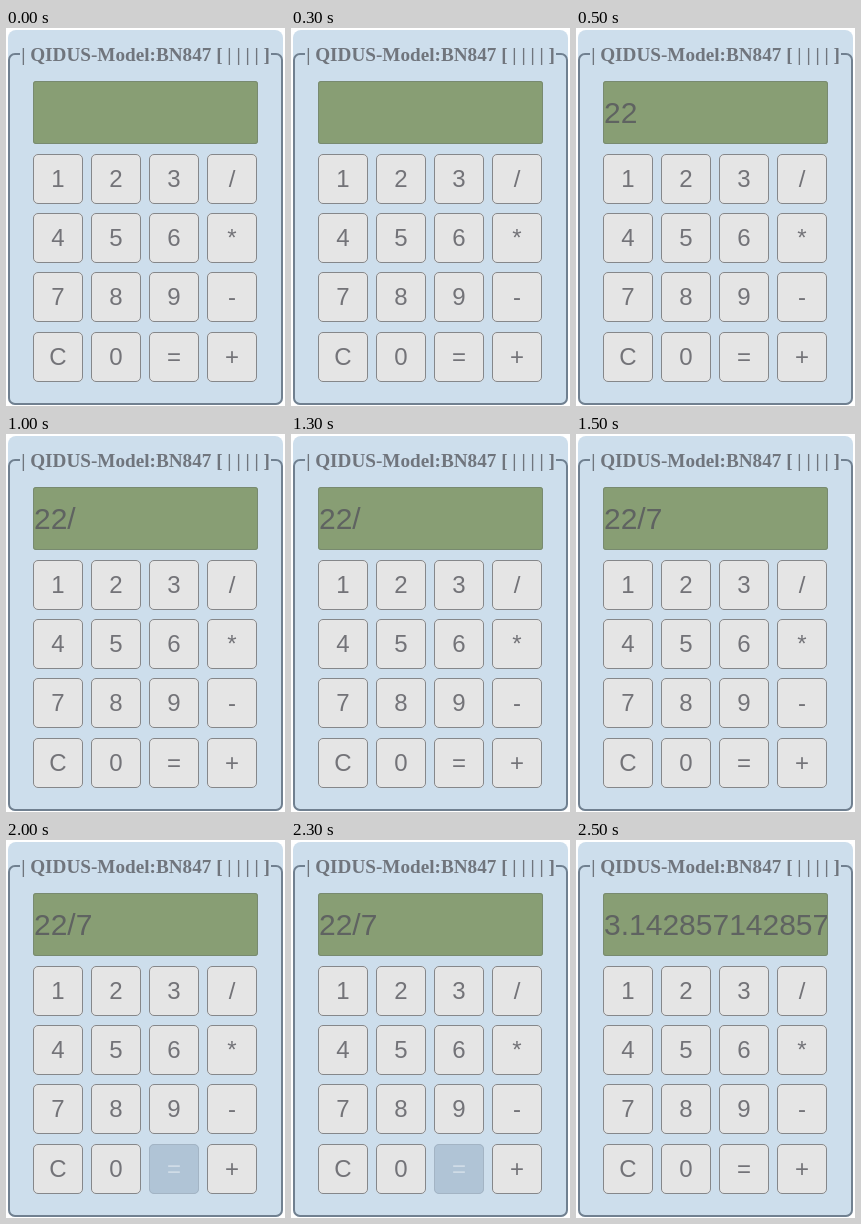
Write an HTML page with a canvas that moves like this. It is 279 by 378 pixels and loops after 3000 ms.

```html
<!DOCTYPE html>
<html lang="en">
<head>
<meta charset="utf-8">
<title>Calculator</title>
<style>
  html, body { margin: 0; width: 100%; height: 100%; overflow: hidden; background: #fff; }
  canvas { display: block; }
</style>
</head>
<body>
<canvas id="stage" width="279" height="378"></canvas>
<script>
const ctx = document.getElementById('stage').getContext('2d');
const SANS = '"Liberation Sans", Arial, sans-serif';
const SERIF = '"Liberation Serif", "Times New Roman", serif';
const LOOP = 3000, STEP = 500;
const STEPS = [
  { text: '' },
  { text: '22' },
  { text: '22/' },
  { text: '22/7' },
  { text: '22/7', pressed: '=' },
  { text: '3.142857142857' }
];
const KEYS = ['123/', '456*', '789-', 'C0=+'];
const ROWS = [126, 185, 244, 304];

function box(x, y, w, h, radius, fill, stroke, line = 1) {
  ctx.beginPath();
  ctx.roundRect(x, y, w, h, radius);
  if (fill) {
    ctx.fillStyle = fill;
    ctx.fill();
  }
  if (stroke) {
    ctx.beginPath();
    ctx.roundRect(x + line / 2, y + line / 2, w - line, h - line, radius - line / 2);
    ctx.strokeStyle = stroke;
    ctx.lineWidth = line;
    ctx.stroke();
  }
}

function label(text, x, y, font, color, align = 'left') {
  ctx.font = font;
  ctx.fillStyle = color;
  ctx.textAlign = align;
  ctx.fillText(text, x, y);
}

function drawCase() {
  box(2, 2, 275, 375, 8, '#cddeec');
  box(2, 25, 275, 352, 7, null, '#708090', 2);
  ctx.fillStyle = '#cddeec';
  ctx.fillRect(14, 16, 251, 20);
  label('| QIDUS-Model:BN847 [ | | | | ]', 139.5, 33, `bold 19.2px ${SERIF}`, '#70757d', 'center');
}

function drawDisplay(text) {
  box(27, 53, 225, 63, 3, '#889e74', '#788a70');
  ctx.save();
  ctx.beginPath();
  ctx.rect(28, 54, 223, 61);
  ctx.clip();
  label(text, 28, 95, `30px ${SANS}`, '#5f6361');
  ctx.restore();
}

function drawKey(key, x, y, pressed) {
  box(x, y, 50, 50, 5, pressed ? '#b0c4d6' : '#e5e5e5', pressed ? '#a3b4c4' : '#85878a');
  label(key, x + 25, y + 33, `24px ${SANS}`, pressed ? '#d0dce7' : '#737378', 'center');
}

function draw(time) {
  const { text, pressed } = STEPS[Math.floor(time % LOOP / STEP)];
  ctx.fillStyle = '#fff';
  ctx.fillRect(0, 0, 279, 378);
  drawCase();
  drawDisplay(text);
  KEYS.forEach((row, r) => [...row].forEach((key, c) =>
    drawKey(key, 27 + 58 * c, ROWS[r], key === pressed)));
}

const start = performance.now();
function tick() {
  draw(performance.now() - start);
  requestAnimationFrame(tick);
}
tick();
</script>
</body>
</html>
```
